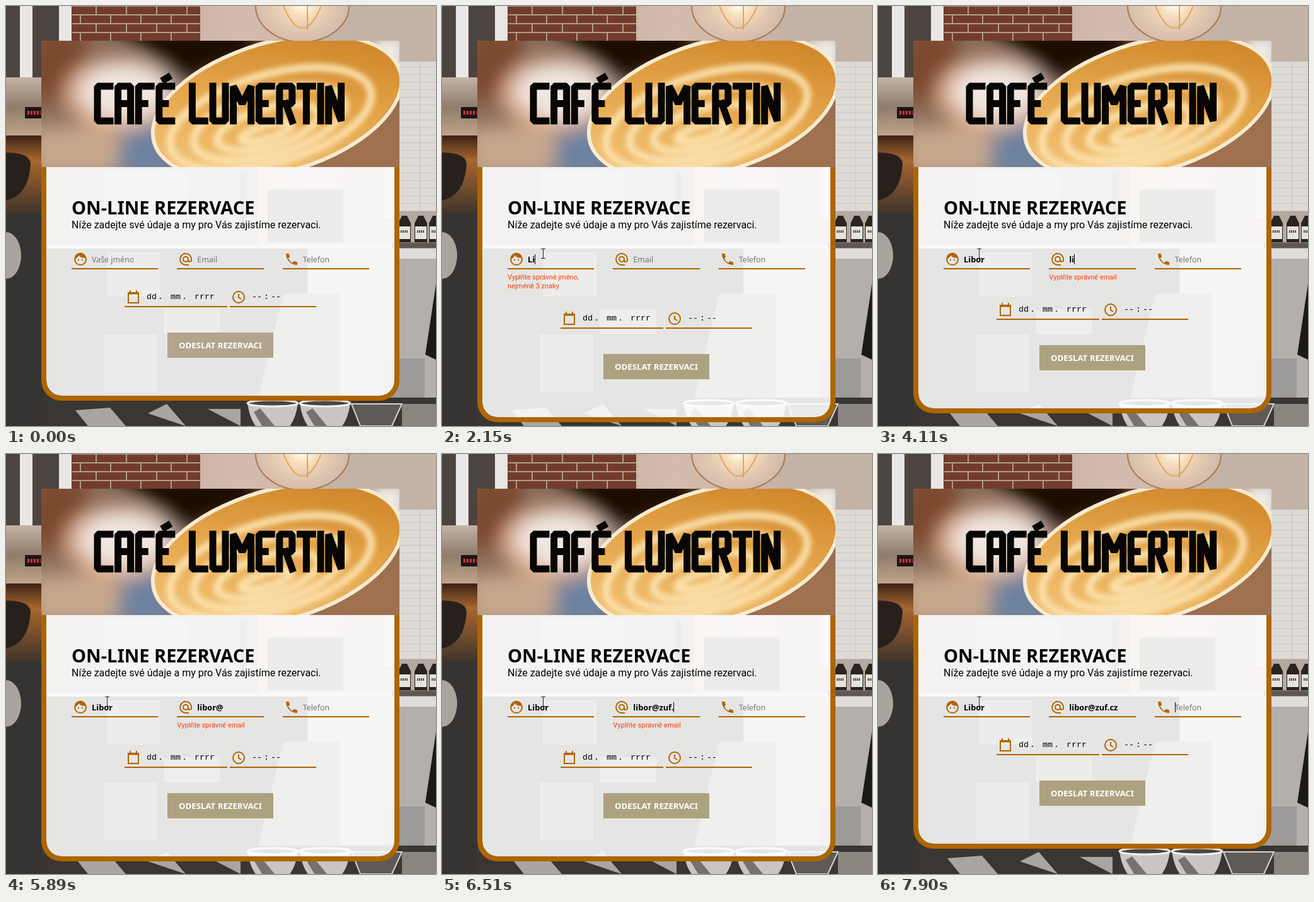
Animation of 682 by 665 pixels, one loop 8000 ms. Source, as an HTML page:

```html
<!DOCTYPE html>
<html lang="cs">
<head>
<meta charset="utf-8">
<title>On-line rezervace</title>
<style>
  html, body { margin: 0; width: 100%; height: 100%; overflow: hidden; background: #333; }
  #stage { position: relative; width: 682px; height: 665px; overflow: hidden; }
  #stage > svg { position: absolute; left: 0; top: 0; }
  #stage > svg.banner { left: 56px; top: 55px; }

  .card {
    position: absolute; left: 56px; top: 255px; width: 568px; box-sizing: border-box;
    padding: 130px 40px 60px; border: solid #ae6500; border-width: 0 8px 8px;
    border-radius: 0 0 32px 32px; background: rgba(255, 255, 255, .87); background-clip: padding-box;
  }
  h1, .lead { position: absolute; left: 40px; margin: 0; white-space: nowrap; color: #000; }
  h1 { top: 44px; font: 700 29px/40px "Noto Sans", sans-serif; }
  .lead { top: 80px; font: 16px/24px Roboto, sans-serif; }

  .row { display: flex; align-items: flex-start; gap: 30px; }
  .row > div { flex: 1 1 0; min-width: 0; }
  .row.when { margin-top: 28px; justify-content: center; gap: 4px; }
  .row.when > div { flex: none; width: 137px; }
  .row.when > .date { width: 163px; }
  .field {
    position: relative; height: 30px; padding-left: 32px; border-bottom: 2px solid #ae6500;
    font: 12.4px/32px "Noto Sans", sans-serif; white-space: pre; color: #757575;
  }
  .field svg { position: absolute; left: 2px; top: 4px; fill: none; stroke: #ae6500; stroke-width: 2; }
  .field svg .solid { fill: #ae6500; stroke: none; }
  .value { font-weight: 700; font-size: 12.8px; color: #000; }
  .caret { position: absolute; top: 8px; width: 1px; height: 16px; background: #000; visibility: hidden; }
  .when .field { padding-left: 35px; font: 13.33px/32px "Liberation Mono", monospace; color: #000; }
  .when i { font-style: normal; margin: 0 12px 0 2px; }
  .when .time i { margin: 0 3px; }
  .error { margin-top: 6px; font: 11px/14px Roboto, sans-serif; color: #ff3a08; }
  .error:empty { display: none; }

  .send {
    margin: 40px auto 0; width: 168px; height: 40px; background: #b3a48d; color: #fff;
    font: 700 13.2px/41px "Noto Sans", sans-serif; text-align: center; white-space: nowrap;
  }
  .send.touched { background: #ada280; }
  #pointer { visibility: hidden; }
</style>
</head>
<body>
<div id="stage">

  <!-- café interior -->
  <svg width="682" height="665">
    <defs>
      <pattern id="bricks" width="48" height="28" patternUnits="userSpaceOnUse">
        <rect width="48" height="28" fill="#b59a8c"/>
        <path d="M0 7H46M0 21H21M23 21H48" stroke="#713c2d" stroke-width="12"/>
      </pattern>
      <pattern id="tiles" width="36" height="12" patternUnits="userSpaceOnUse">
        <rect width="36" height="12" fill="#dedad6"/>
        <path d="M0 .5H36M8 0V12" stroke="#cac4be"/>
      </pattern>
      <linearGradient id="wall"><stop offset="0" stop-color="#bd9b88"/><stop offset=".55" stop-color="#d3bcae"/><stop offset="1" stop-color="#b9aaa0"/></linearGradient>
      <linearGradient id="steel" x2="0" y2="1"><stop stop-color="#c4b3a3"/><stop offset=".5" stop-color="#8f7c6c"/><stop offset="1" stop-color="#c3a58b"/></linearGradient>
      <linearGradient id="copper" x2="0" y2="1"><stop stop-color="#3a2315"/><stop offset=".3" stop-color="#a8662f"/><stop offset="1" stop-color="#37302c"/></linearGradient>
      <radialGradient id="glow"><stop stop-color="#fffbe8"/><stop offset=".3" stop-color="#f6ddba"/><stop offset="1" stop-color="#dcc1ad" stop-opacity=".5"/></radialGradient>
      <g id="bottle">
        <path d="M6 0H14L20 12V42H0V12Z" fill="#29241f"/>
        <path d="M1 27H19" stroke="#e6e2dc" stroke-width="20"/>
        <path d="M4 25H16" stroke="#5a544e" stroke-width="4" stroke-dasharray="2 1"/>
      </g>
      <g id="cup">
        <path d="M-40 0Q-36 30-20 44H20Q36 30 40 0Z" fill="#c9c6c2"/>
        <path d="M-30 14L-12 44H10L-20 8Z" fill="#77726d"/>
        <ellipse rx="40" ry="5" fill="#4a4642" stroke="#f2f0ed" stroke-width="3"/>
      </g>
    </defs>

    <rect width="682" height="400" fill="url(#wall)"/>
    <rect width="105" height="113" fill="#4c443f"/>
    <path d="M32 0V113M94 0V60" stroke="#e9e7e5" stroke-width="20"/>
    <rect x="105" width="203" height="60" fill="url(#bricks)"/>
    <rect x="574" width="108" height="90" fill="#c3b3a6"/>
    <rect x="600" y="88" width="82" height="247" fill="url(#tiles)"/>
    <ellipse cx="470" rx="74" ry="57" fill="url(#glow)" stroke="#a9764e" stroke-width="2"/>
    <path d="M440 0Q470 70 500 0M478 0V38" fill="none" stroke="#e2a35c" stroke-width="2"/>

    <rect y="113" width="56" height="94" fill="url(#steel)"/>
    <path d="M30 169H57" stroke="#1b1514" stroke-width="18"/>
    <path d="M34 169H55" stroke="#d5303a" stroke-width="6" stroke-dasharray="3 2"/>
    <rect y="205" width="60" height="130" fill="url(#copper)"/>
    <path d="M0 232Q38 232 39 250Q36 300 0 308Z" fill="#27201d"/>

    <!-- mostly behind the form -->
    <rect x="60" y="255" width="340" height="125" fill="#a09a94"/>
    <rect x="155" y="262" width="135" height="88" fill="#b9b5b0"/>
    <rect x="415" y="290" width="120" height="85" fill="#706962"/>
    <path d="M376 266V350" stroke="#706962" stroke-width="8"/>
    <rect y="330" width="60" height="335" fill="#363433"/>
    <rect x="56" y="378" width="626" height="287" fill="#343332"/>
    <path d="M56 381H682" stroke="#d9d5d0" stroke-width="6"/>
    <rect x="160" y="390" width="85" height="70" fill="#77746f"/>
    <rect x="155" y="520" width="85" height="92" fill="#77746f"/>
    <rect x="250" y="480" width="90" height="40" fill="#77746f"/>
    <rect x="478" y="384" width="204" height="256" fill="#b4afaa"/>
    <path d="M440 455H530V620H400Z" fill="#82807c"/>
    <rect x="624" y="325" width="58" height="53" fill="#b6aaa0"/>
    <use href="#bottle" x="622" y="332"/><use href="#bottle" x="648" y="332"/><use href="#bottle" x="671" y="332"/>
    <path d="M612 379H682" stroke="#5f5852" stroke-width="9"/>
    <path d="M612 392H682" stroke="#e0dcd8" stroke-width="16"/>
    <path d="M682 440L665 552 682 560Z" fill="#1c1a19"/>
    <rect x="600" y="558" width="64" height="78" fill="#9c9b9a"/>
    <ellipse cy="395" rx="24" ry="37" fill="#aaa49e"/>

    <rect x="56" y="620" width="626" height="45" fill="#393634"/>
    <path d="M110 640L165 636 190 665H130ZM225 645L255 630 285 665ZM320 638H372V665Z" fill="#aaa5a0"/>
    <use href="#cup" x="423" y="629"/><use href="#cup" x="506" y="629"/>
    <path d="M548 630H628L612 665H562Z" fill="#5f5a56" stroke="#d9d6d3" stroke-width="2"/>
    <rect x="628" y="630" width="54" height="35" fill="#8b8580"/>
  </svg>

  <!-- banner -->
  <svg class="banner" width="568" height="200" viewBox="56 55 568 200">
    <defs>
      <filter id="soft" x="-50%" y="-50%" width="200%" height="200%"><feGaussianBlur stdDeviation="15"/></filter>
      <filter id="swirl"><feGaussianBlur stdDeviation="4"/></filter>
      <linearGradient id="coffee" x1="0" y1="1" x2="1" y2="0"><stop stop-color="#f7cf8b"/><stop offset=".5" stop-color="#e5a74c"/><stop offset="1" stop-color="#c77a1d"/></linearGradient>
    </defs>
    <rect x="56" y="55" width="568" height="200" fill="#8a6d5a"/>
    <g filter="url(#soft)">
      <rect x="40" y="40" width="90" height="110" fill="#7b4a2e"/>
      <path d="M160 30H400V85L280 120Z" fill="#1f0c06"/>
      <rect x="40" y="190" width="140" height="80" fill="#c7a78b"/>
      <path d="M185 175L270 110V270H175Z" fill="#6d82a0"/>
      <path d="M520 210L640 150V270H470Z" fill="#a0714f"/>
      <rect x="575" y="40" width="65" height="70" fill="#f1eeea"/>
      <ellipse cx="180" cy="140" rx="88" ry="58" fill="#d9a684"/>
      <ellipse cx="188" cy="136" rx="72" ry="44" fill="#f0e6e0"/>
    </g>
    <g transform="translate(430 160) rotate(-16)">
      <ellipse rx="206" ry="106" fill="#f8ead0"/>
      <ellipse rx="200" ry="100" fill="url(#coffee)"/>
      <g id="latte" filter="url(#swirl)" fill="none" stroke="#fbe0ab" stroke-width="12"></g>
    </g>
    <g id="sign" role="img" aria-label="CAFÉ LUMERTIN" fill="none" stroke="#080604" stroke-width="11"
       stroke-linejoin="bevel" stroke-linecap="square"></g>
  </svg>

  <div class="card">
    <h1>ON-LINE REZERVACE</h1>
    <p class="lead">Níže zadejte své údaje a my pro Vás zajistíme rezervaci.</p>
    <div class="row" id="inputs"></div>
    <div class="row when">
      <div class="date"><div class="field" data-icon="date">dd<i>.</i>mm<i>.</i>rrrr</div></div>
      <div class="time"><div class="field" data-icon="clock">--<i>:</i>--</div></div>
    </div>
    <div class="send">ODESLAT REZERVACI</div>
  </div>

  <svg id="pointer" width="9" height="17" fill="none" stroke="#222">
    <path d="M1 .5H8M4.5 1V15M1 15.5H8"/>
  </svg>
</div>

<script>
const LOOP = 8000;
const $ = selector => document.querySelector(selector);

$('#latte').innerHTML = [0, 1, 2, 3].map(i =>
  `<ellipse cx="${-15 - 4 * i}" cy="${15 + 6 * i}" rx="${165 - 41 * i}" ry="${70 - 20 * i}"/>`).join('');

// Sign letters join points of a 3 x 3 grid, named a to i row by row.
const glyphs = {
  C: 'fcagil', A: 'gaci df', F: 'cag de', E: 'cagi de', É: 'cagi de', L: 'agi',
  U: 'agic', M: 'gaeci', R: 'gacfd ei', T: 'ac bh', I: 'bh', N: 'gaic'
};
glyphs.C = 'caig'.replace('ig', 'gi');
function drawSign(text) {
  let x = 145;
  return [...text].map(letter => {
    if (letter === ' ') { x += 20; return ''; }
    const half = { M: 14, I: 0 }[letter] ?? 10;
    const point = key => {
      const n = key.charCodeAt(0) - 97;
      return `${x + n % 3 * half} ${127 + Math.floor(n / 3) * 27.5}`;
    };
    let d = glyphs[letter].split(' ').map(line => 'M' + [...line].map(point).join('L')).join('');
    if (letter === 'É') d += `M${x + 9} 116l5-3`;
    x += 2 * half + 12.6;
    return `<path d="${d}"/>`;
  }).join('');
}
$('#sign').innerHTML = drawSign('CAFÉ LUMERTIN');

const icons = {
  face: '<circle cx="12" cy="12" r="9"/><path class="solid" d="M3 12Q8 10 9.3 5.8 13 11 21 9.5A9 9 0 0 0 3 12"/><path d="M8 13h2M14 13h2"/>',
  at: '<circle cx="12" cy="12" r="4"/><path d="M17 21h-5a9 9 0 1 1 9-9v1.4a2.5 2.5 0 0 1-5 0V12"/>',
  phone: '<path class="solid" d="M6.6 10.8a15 15 0 0 0 6.6 6.6l2.5-2.5L21 16.5V21A18 18 0 0 1 3 3H7.5L9.1 8.3z"/>',
  date: '<path d="M4 5H20V21H4ZM4 6.5H20M7 1V5M17 1V5"/>',
  clock: '<circle cx="12" cy="12" r="9"/><path d="M12 7V12.5L16 15"/>'
};

const inputs = [['face', 'Vaše jméno'], ['at', 'Email'], ['phone', 'Telefon']];
$('#inputs').innerHTML = inputs.map(([icon, hint]) =>
  `<div><div class="field" data-icon="${icon}"><span class="value"></span><span class="caret"></span><span class="hint">${hint}</span></div><div class="error"></div></div>`
).join('');
document.querySelectorAll('.field').forEach(field => field.insertAdjacentHTML('afterbegin',
  `<svg width="24" height="24">${icons[field.dataset.icon]}</svg>`));

const boxes = [...$('#inputs').children].map(box => ({
  value: box.querySelector('.value'),
  caret: box.querySelector('.caret'),
  hint: box.querySelector('.hint'),
  error: box.querySelector('.error')
}));

const NAME = 'Libor', MAIL = 'libor@zuf.cz';
const NAME_ERROR = 'Vyplňte správně jméno, nejméně 3 znaky';
const MAIL_ERROR = 'Vyplňte správně email';

// Times of key presses, focus changes and caret toggles
const nameKeys = [1850, 2080, 2780, 2850, 2930];
const mailKeys = [4110, 4110, 4340, 4410, 5040, 5570, 5970, 6050, 6200, 6430, 6660, 6740];
const focusAt = [600, 3330, 7900];
const blinks = [600, 1070, 1620, 2610, 2780, 3160, 3330, 3800, 4110, 4880,
  5040, 5420, 5570, 5890, 5970, 6970, 7500];

const passed = (times, t) => times.filter(time => time <= t).length;
const mailOk = mail => !mail || /^\w+@\w+(\.\w+)*$/.test(mail);

function showForm(t) {
  const name = NAME.slice(0, passed(nameKeys, t));
  const mail = MAIL.slice(0, passed(mailKeys, t));
  const values = [name, mail, ''];
  const errors = [
    name && name.length < 3 ? NAME_ERROR : '',
    mailOk(mail) ? '' : MAIL_ERROR,
    ''
  ];
  const focus = passed(focusAt, t) - 1;
  const caretOn = passed(blinks, t) % 2 === 1;
  boxes.forEach((box, i) => {
    box.value.textContent = values[i];
    box.hint.hidden = values[i] !== '';
    box.error.textContent = errors[i];
    box.caret.style.visibility = i === focus && caretOn ? 'visible' : 'hidden';
  });
  $('.send').classList.toggle('touched', name !== '');
}

// The pointer glides up from the button in six steps, then settles on the name.
function pointerAt(t) {
  if (t >= 670) return [160, 392];
  if (t >= 600) return [165, 389];
  const p = Math.min(5, Math.floor((t - 68) / 72)) / 5;
  return [293 - 143 * p, 524 - 137 * p];
}

const pointer = $('#pointer');
function showPointer(t) {
  const [x, y] = pointerAt(t);
  pointer.style.visibility = t < 70 ? 'hidden' : 'visible';
  pointer.style.transform = `translate(${Math.round(x) - 4}px, ${Math.round(y) - 8}px)`;
}

function frame() {
  const t = performance.now() % LOOP;
  showForm(t);
  showPointer(t);
  requestAnimationFrame(frame);
}
frame();
</script>
</body>
</html>
```
